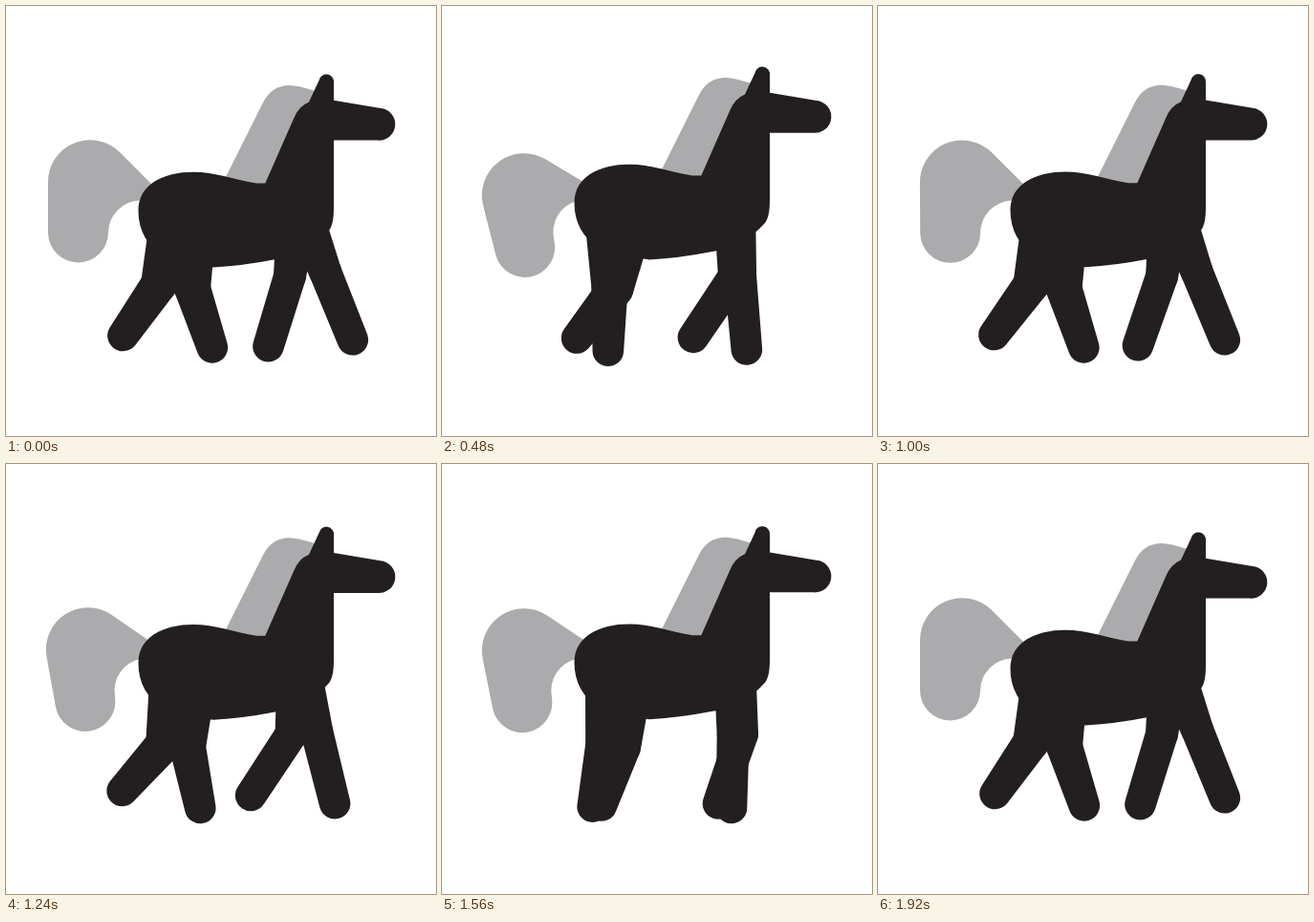
Write an HTML page with a canvas that moves like this. It is 450x450 px and loops after 1960 ms.

```html
<!DOCTYPE html>
<html lang="en">
<head>
<meta charset="utf-8">
<title>Trotting horse</title>
<style>
  html, body { margin: 0; width: 100%; height: 100%; overflow: hidden; background: #fff; }
  canvas { display: block; width: 450px; height: 450px; }
</style>
</head>
<body>
<canvas id="stage" width="450" height="450"></canvas>
<script>
const ctx = document.getElementById('stage').getContext('2d');
const BLACK = '#231f20', GREY = '#abaaac';
const STEP = 40, LOOP = 1960, CYCLE = 1920, STRIDE = CYCLE / 2;
const RAD = Math.PI / 180;

const tail = new Path2D('M44 185A44 44 0 0 1 119 153L160 194L140 203.5A34 34 0 0 0 107 237A31.5 31.5 0 0 1 44 237Z');
const mane = new Path2D('M229 181L269 101Q278 83 297 83Q305 83 324 89L320 110L272 192Z');
const body = new Path2D('M138.5 214C138.5 187 164 173.7 196 173.7C218 173.7 240 182 262 185.5H271.3L301 118' +
  'Q306 105 317 100.5L327.5 78A7.8 7.8 0 0 1 343 80.5V98.7L392 107A16.8 16.8 0 0 1 389 140.6H343V211' +
  'C343 221 342 230 338 235Q315 261 280 265.5Q250 271.5 217 273.5Q190 270 165 262Q138.5 245 138.5 214Z');

// Joint angles in degrees, forward positive: the hoof swings through
// the first half of the cycle and bears weight in the second.
const times = [0, 320, 480, 760, 960, 1280, 1440, 1720];
const fore = {
  x: 306, y: 205, hip: 22, knee: 17, upper: 78, lower: 77,
  thigh: [-6.6, -5, 0, 14, 21, 13, 4.5, -6.6],
  shin: [-17, -35, -34, 4, 22, 12.5, 5, -9.5]
};
const hind = {
  x: 185, y: 228, hip: 35, knee: 19, upper: 68, lower: 65.5,
  thigh: [-21.5, -15.5, -3, 9.5, 8.5, 3, -8, -19],
  shin: [-35, -42, -38, 6, 18.5, 10, -1.5, -21.5]
};
const HOOF = 16.3;

const count = times.length;
const timeAt = i => times[(i + count) % count] + CYCLE * Math.floor(i / count);

// Smooth cyclic curve through the key angles.
function angleAt(keys, t) {
  let i = count - 1;
  while (times[i] > t) i--;
  const key = n => keys[(n + count) % count];
  const span = timeAt(i + 1) - timeAt(i);
  const slope = n => (key(n + 1) - key(n - 1)) / (timeAt(n + 1) - timeAt(n - 1)) * span;
  const u = (t - timeAt(i)) / span, v = 1 - u;
  return key(i) * v * v * (1 + 2 * u) + key(i + 1) * u * u * (1 + 2 * v)
    + u * v * (slope(i) * v - slope(i + 1) * u);
}

// Lift of the body, 0 to 1, once per stride.
function liftAt(t) {
  const peak = 440, p = t % STRIDE;
  const phase = p < peak ? p / peak : (STRIDE - p) / (STRIDE - peak);
  return (1 - Math.cos(Math.PI * phase)) / 2;
}

function limb(x1, y1, r1, x2, y2, r2) {
  const dir = Math.atan2(y2 - y1, x2 - x1);
  const off = Math.acos((r1 - r2) / Math.hypot(x2 - x1, y2 - y1));
  ctx.beginPath();
  ctx.arc(x1, y1, r1, dir + off, dir - off + 2 * Math.PI);
  ctx.arc(x2, y2, r2, dir - off, dir + off);
  ctx.fill();
}

function drawLeg(leg, t) {
  const thigh = angleAt(leg.thigh, t) * RAD, shin = angleAt(leg.shin, t) * RAD;
  const kx = leg.x + leg.upper * Math.sin(thigh), ky = leg.y + leg.upper * Math.cos(thigh);
  const hx = kx + leg.lower * Math.sin(shin), hy = ky + leg.lower * Math.cos(shin);
  limb(leg.x, leg.y, leg.hip, kx, ky, leg.knee);
  limb(kx, ky, leg.knee, hx, hy, HOOF);
}

function draw(t) {
  const lift = liftAt(t);
  ctx.clearRect(0, 0, 450, 450);

  ctx.save();
  ctx.translate(0, -8 * lift);
  ctx.fillStyle = GREY;
  ctx.fill(mane);
  ctx.save();
  ctx.translate(174, 204);
  ctx.rotate(-14.5 * lift * RAD);
  ctx.translate(-174, -204);
  ctx.fill(tail);
  ctx.restore();
  ctx.fillStyle = BLACK;
  ctx.fill(body);
  ctx.restore();

  ctx.fillStyle = BLACK;
  for (const leg of [hind, fore]) {
    drawLeg(leg, t);
    drawLeg(leg, (t + STRIDE) % CYCLE);
  }
}

const start = performance.now();
function tick() {
  const elapsed = Math.max(0, performance.now() - start) % LOOP;
  draw(Math.floor(elapsed / STEP) * STEP % CYCLE);
  requestAnimationFrame(tick);
}
tick();
</script>
</body>
</html>
```
